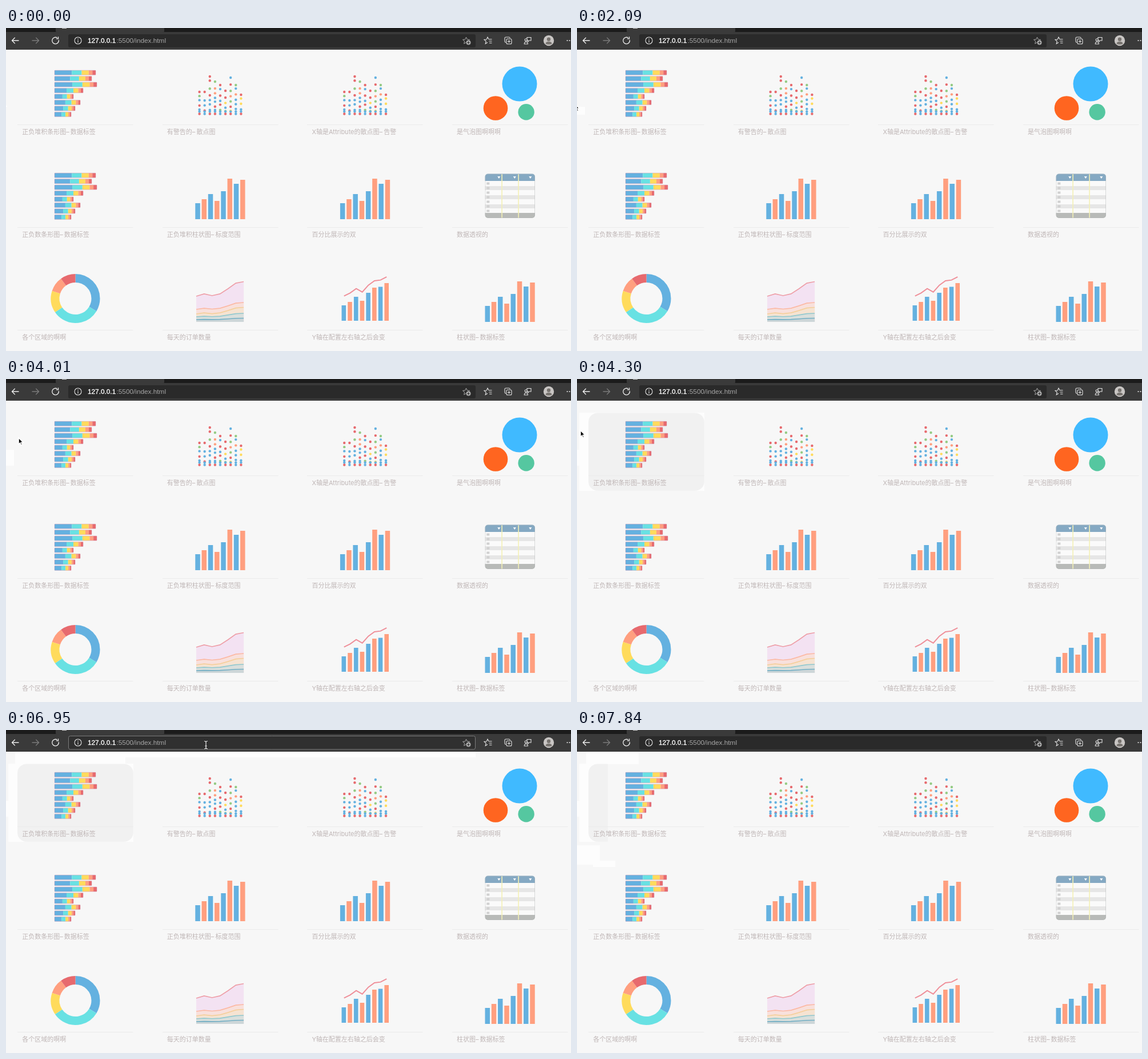
Animation, 989 px wide and 566 px high, one loop 7.99 s. Source, as an HTML page with a canvas:

```html
<!DOCTYPE html>
<html lang="zh">
<head>
<meta charset="utf-8">
<style>
html, body { margin: 0; width: 100%; height: 100%; overflow: hidden; background: #f7f7f7; }
canvas { display: block; }
</style>
</head>
<body>
<canvas id="stage" width="989" height="566"></canvas>
<script>
const screenCtx = document.getElementById('stage').getContext('2d');
let ctx = screenCtx;
const LOOP = 7990, SAMPLE = 147.8, COL = 253.6, ROW = 180;
const SANS = 'Inter, "Noto Sans CJK SC", "Noto Sans CJK", sans-serif';
const C = { b: '#64b1e0', t: '#68e1e3', y: '#ffdb5c', o: '#ff9f7f', r: '#e76a6e', g: '#94cb84' };

function rect(x, y, w, h, fill) {
  ctx.fillStyle = fill;
  ctx.fillRect(x, y, w, h);
}
function round(x, y, w, h, r, fill, stroke, lw = 1) {
  ctx.beginPath();
  ctx.roundRect(x, y, w, h, r);
  if (fill) { ctx.fillStyle = fill; ctx.fill(); }
  if (stroke) { ctx.strokeStyle = stroke; ctx.lineWidth = lw; ctx.stroke(); }
}
function dot(x, y, r, fill) {
  ctx.fillStyle = fill;
  ctx.beginPath();
  ctx.arc(x, y, r, 0, 7);
  ctx.fill();
}
function path(d, stroke, lw = 1.2, fill) {
  const p = new Path2D(d);
  if (fill) { ctx.fillStyle = fill; ctx.fill(p); }
  if (stroke) { ctx.strokeStyle = stroke; ctx.lineWidth = lw; ctx.stroke(p); }
}
function text(s, x, y, fill, font) {
  ctx.font = font;
  ctx.fillStyle = fill;
  ctx.fillText(s, x, y);
}
function at(x, y, draw) {
  ctx.save();
  ctx.translate(x, y);
  draw();
  ctx.restore();
}
function randomFrom(seed) {
  return () => (seed = seed * 16807 % 2147483647) / 2147483647;
}

// Thumbnails, placed relative to the top left of their grid cell
function stacked() {
  [72, 65, 74, 50, 33, 45, 36, 29].forEach((w, i) => {
    const y = 14.2 + i * 10.45;
    let from = 0;
    [.42, .66, .83, .92, 1].forEach((to, k) => {
      rect(65 + from * w, y, (to - from) * w, 8, C['btyor'[k]]);
      from = to;
    });
    round(65, y, w, 8, 1, null, 'rgba(205,140,170,.45)');
  });
}

// Each column falls from its highest dot to a dense row at the bottom
function scatter() {
  const rnd = randomFrom(77);
  [52, 52, 25, 34, 40, 50, 27, 40, 57].forEach((top, c) => {
    const x = 65 + c * 9.1;
    for (let y = top; y < 86; y += 6 + rnd() * (y < 55 ? 9 : 4)) {
      const hues = y < 62 ? 'rggrob' : 'bbbgryb';
      dot(x, y, 2.2, C[hues[Math.floor(rnd() * hues.length)]]);
    }
    dot(x, 86.5, 2.2, C.b);
    dot(x, 90.5, 2.2, C[c % 3 == 1 ? 'b' : 'r']);
  });
}

function bars(x, pitch, w, bottom, heights) {
  heights.forEach((h, i) => rect(x + i * pitch, bottom - h, w, h, i % 2 ? C.o : C.b));
}
const columns = () => bars(57.7, 11.25, 8.5, 95, [28, 35, 44, 32, 49, 71, 62, 69]);

function bubbles() {
  dot(118.2, 38, 30.5, '#40baff');
  dot(76.2, 80.5, 21.3, '#ff6520');
  dot(129.8, 87.3, 14.2, '#55c7a0');
}

function table() {
  ctx.beginPath();
  ctx.roundRect(57.7, 15.5, 87.5, 77.5, 5);
  ctx.clip();
  rect(57, 15, 90, 80, '#fafafa');
  for (let i = 0; i < 3; i++) rect(57, 37 + i * 16, 90, 7, '#e6e6e6');
  for (let i = 0; i < 7; i++) rect(60.5, 30.5 + i * 8, 5, 4, '#d0d0d0');
  rect(57, 15, 90, 13, '#85a9c3');
  rect(57, 84, 90, 10, '#b8bab8');
  for (let i = 0; i < 3; i++) {
    if (i) rect(57.5 + i * 29, 16, 1.6, 77, '#f3f0b4');
    path(`M${52 + i * 27.5 + 27.5} 20h5l-2.5 4z`, null, 0, '#fff');
  }
  round(58.2, 16, 86.5, 76.5, 5, null, 'rgba(175,180,180,.45)');
}

function donut() {
  let from = -90;
  ctx.lineWidth = 15;
  [121, 115, 52, 36, 36].forEach((sweep, i) => {
    const to = from + sweep, rad = Math.PI / 180;
    ctx.strokeStyle = C['btyor'[i]];
    ctx.beginPath();
    ctx.arc(101.5, 54, 35.5, from * rad, to * rad);
    ctx.stroke();
    from = to;
  });
}

const polyline = (x, pitch, ys) => 'M' + ys.map((y, i) => `${x + i * pitch} ${y}`).join('L');

// All layers share one profile: right end, height of the slope, fill, line
function area() {
  const profile = [1, .84, .96, .84, .49, .1, 0];
  const layers = [
    [24.5, 25.5, '#f3e2f2', '#ee9fa8'], [61, 12, '#f8e0dc', '#fcb9a4'], [69.5, 11.5, '#f5e3d2', '#f5cf9c'],
    [80, 6, '#d9dfdc', '#93c9cf'], [88.5, 2.5, '#cdd6d8', '#72aec4']
  ];
  for (const [end, rise, fill, line] of layers) {
    const d = polyline(59.4, 13.85, profile.map(p => end + p * rise));
    path(d + 'V95H59.4Z', null, 0, fill);
    path(d, line, 1.7);
  }
}

function combo() {
  const heights = [27, 33, 42, 35, 49, 58, 59.5, 66];
  bars(60.3, 10.7, 7.6, 93, heights);
  path(polyline(64.5, 10.65, heights.map(h => 72.8 - .86 * h)), '#ef8f99', 2);
}

const cells = [
  [stacked, '正负堆积条形图–数据标签'], [scatter, '有警告的–散点图'],
  [scatter, 'X轴是Attribute的散点图–告警'], [bubbles, '是气泡图啊啊啊'],
  [stacked, '正负数条形图–数据标签'], [columns, '正负堆积柱状图–标度范围'],
  [columns, '百分比展示的双'], [table, '数据透视的'],
  [donut, '各个区域的啊啊'], [area, '每天的订单数量'],
  [combo, 'Y轴在配置左右轴之后会变'], [columns, '柱状图–数据标签']
];
const cellX = i => 20 + i % 4 * COL, cellY = i => 60 + Math.floor(i / 4) * ROW;

// The thumbnails never change, so they are drawn once
const icons = document.createElement('canvas');
icons.width = 989;
icons.height = 566;
ctx = icons.getContext('2d');
cells.forEach(([icon], i) => at(cellX(i), cellY(i), icon));
ctx = screenCtx;

function label(s, x, y) {
  const font = '11px ' + SANS, ink = '#bfb6b6';
  const [head, tail] = s.split('–');
  text(head, x, y, ink, font);
  if (!tail) return;
  x += ctx.measureText(head).width;
  text('–', x, y, ink, font);
  text(tail, x + 7.6, y, ink, font);
}
function grid() {
  ctx.filter = 'blur(.6px)';
  ctx.drawImage(icons, 0, 0);
  ctx.filter = 'none';
  cells.forEach(([, name], i) => {
    rect(Math.round(cellX(i)), cellY(i) + 109, 202.5, 1, '#ebebeb');
    label(name, cellX(i) + 8.2, cellY(i) + 126.3);
  });
}

const star = 'M0 -6L1.8 -2L6 -1.6L2.8 1.2L3.8 5.5L0 3.2L-3.8 5.5L-2.8 1.2L-6 -1.6L-1.8 -2Z';
function chrome(hover) {
  const ink = '#e4e4e4';
  rect(0, 0, 989, 38, '#3a3a3a');
  rect(0, 0, 989, 7, '#1b1b1b');
  round(87, -6, 190, 14, 3, '#3a3a3a');
  rect(98, 0, 8, 1, '#c8c8c8');
  round(109, 11, 713, 23, 3, hover ? '#303030' : '#2a2a2a');
  if (hover) round(109.5, 10.5, 712, 23.5, 3, null, '#7c7c7c');
  const arrow = 'M6 0H-6M-0.8 -5.2L-6 0L-0.8 5.2';
  at(16.5, 22, () => path(arrow, '#f0f0f0', 1.3));
  at(51.5, 22, () => { ctx.scale(-1, 1); path(arrow, '#7b7b7b', 1.3); });
  at(86.5, 22, () => path('M5.7 -1.2A5.8 5.8 0 1 1 3.2 -4.8M5 -6.8V-3.2H1.4', '#f0f0f0', 1.3));
  at(126, 22, () => {
    path('M-6 0a6 6 0 1 0 12 0a6 6 0 1 0 -12 0M0 -0.8V3.4', ink, 1.1);
    dot(0, -2.7, .8, ink);
  });
  const font = '11.8px "Liberation Sans", Arial, sans-serif';
  text('127.0.0.1', 143, 26, '#fff', font);
  ctx.strokeStyle = '#fff';
  ctx.lineWidth = .35;
  ctx.strokeText('127.0.0.1', 143, 26);
  text(':5500/index.html', 193.5, 26, '#a6a6a6', font);
  at(805.5, 22, () => {
    path(star, '#a8a8a8', 1);
    dot(4, 3.6, 4, '#a8a8a8');
    path('M1.8 3.6h4.4M4 1.4v4.4', '#2a2a2a', 1);
  });
  at(843, 22, () => {
    path('M2 -2.2L0 -6L-1.8 -2L-6 -1.6L-2.8 1.2L-3.8 5.5L0 3.2M2 -2.2H7.5M2.5 1H7.5M3 4.2H7.5', ink, 1.1);
  });
  at(879, 22, () => {
    round(-3, -3, 9, 9, 2, null, ink, 1.1);
    path('M-4 3.5Q-6 3 -6 1V-4Q-6 -6 -4 -6H1Q3 -6 3.4 -4.2M1.5 -1v5M-1 1.5h5', ink, 1.1);
  });
  at(913.5, 22, () => {
    path('M-1.5 -5.5H5.5V0H2L0 2V0H-1.5Z', ink, 1.1);
    path('M-5.3 -1.3a2 2 0 1 0 4 0a2 2 0 1 0 -4 0M-6.3 6Q-6 2.3 -3.2 2.3T0 6Z', ink, 1.1, '#3a3a3a');
  });
  at(950, 22, () => {
    dot(0, 0, 9.2, '#c9c6c4');
    dot(0, -2.2, 3.2, '#77736f');
    path('M-5.6 5.5Q-5 1.8 0 1.8T5.6 5.5Q0 8.5 -5.6 5.5Z', null, 0, '#77736f');
  });
  for (const x of [982.5, 986.5]) dot(x, 22, 1.1, ink);
}

// Hover layer of a card in the top row
function overlay(col) {
  at(20 + col * COL, 59, () => {
    round(0, .4, 202.8, 136.4, 16, 'rgba(0,0,0,.61)');
    round(13.6, 13.6, 12, 12, 1.5, null, '#1688ee', 1.4);
    round(61.7, 45, 79.3, 24, 2, '#058cff');
    ctx.textAlign = 'center';
    text('编辑', 101.6, 60.8, '#fff', 'bold 11px ' + SANS);
    at(87.2, 95.5, () => path('M0 5L-5 0Q-6.6 -3 -4.2 -4.5Q-1.6 -5.6 0 -2.8Q1.6 -5.6 4.2 -4.5Q6.6 -3 5 0Z', '#ddd', 1));
    at(111.8, 95.5, () => path('M-5.5 -3.5H5.5M-2 -3.5V-5.5H2V-3.5M-4.3 -3.5V5.5H4.3V-3.5M-1.7 -1V3.5M1.7 -1V3.5M-4 1H4', '#ccc', 1));
  });
}

// Pale areas and the faint card that repaints leave behind; later ones trim them
function repaints(n) {
  const pale = '#fdfdfd', right = n < 48 ? 223 : n < 49 ? 108 : 54;
  if (n >= 14) rect(0, 138, 14, 14, pale);
  if (n >= 20) rect(0, 124, 14, 28, pale);
  if (n >= 34) rect(16, 38, n < 48 ? 193 : 92, 22, pale);
  if (n >= 35 && n < 48) rect(209, 38, 613, 10, pale);
  if (n >= 50) rect(28, 229, 39, 11, pale);
  if (n >= 51) rect(0, 202, 40, 34, pale);
  if (n < 29) return;
  ctx.save();
  ctx.beginPath();
  ctx.rect(4, 59, right - 4, 137);
  ctx.clip();
  rect(4, 59, 219, 137, pale);
  round(20, 59.4, 202.8, 136.4, 16, '#f1f1f1');
  ctx.restore();
}

// Pointer route: sample number, x, y
const route = [
  [0, -7.5, 129], [2, 0, 132], [4, 6, 138], [7, 5, 138], [10, -8, 133], [14, -4, 133], [17, 10, 127],
  [20, 5, 126], [25, 15, 115], [27, 22, 103], [29, 6, 90], [31, 6, 98], [33, 16, 46], [34, 209, 35],
  [36, 335, 26], [39, 367, 23], [42, 362, 20], [46, 362, 20], [47, 350, 26], [48, 187, 187],
  [49, 54, 226], [51, 1, 203], [53, -7.5, 121]
];
function pointerAt(n) {
  const i = route.findLastIndex(k => k[0] <= n);
  const [n0, x0, y0] = route[i], [n1, x1, y1] = route[i + 1] || [n0 + 1, x0, y0];
  const p = (n - n0) / (n1 - n0);
  return [x0 + (x1 - x0) * p, y0 + (y1 - y0) * p];
}
function pointer(x, y, beam) {
  at(x, y, () => {
    if (beam) {
      const d = 'M-3 -6.5Q0 -6.5 0 -4.5Q0 -6.5 3 -6.5M0 -4.5V5M-3 7Q0 7 0 5Q0 7 3 7M-1.8 2H1.8';
      path(d, '#222', 2.6);
      path(d, '#f2f2f2', 1.2);
    } else {
      path('M0 0V11.5L2.7 9L4.6 13.2L6.7 12.3L4.8 8.2H8.3Z', '#fff', 1.6, '#000');
    }
  });
}

// The recording shows one state per sample
function draw(t) {
  const n = Math.floor(t / SAMPLE), [x, y] = pointerAt(n);
  const inBar = n >= 35 && n < 48;
  rect(0, 0, 989, 566, '#f7f7f7');
  repaints(n);
  grid();
  if (n == 28) overlay(0);
  if (n == 48) overlay(1);
  chrome(inBar);
  pointer(x, y, inBar);
}

const start = performance.now();
function tick() {
  draw((performance.now() - start) % LOOP);
  requestAnimationFrame(tick);
}
tick();
</script>
</body>
</html>
```
